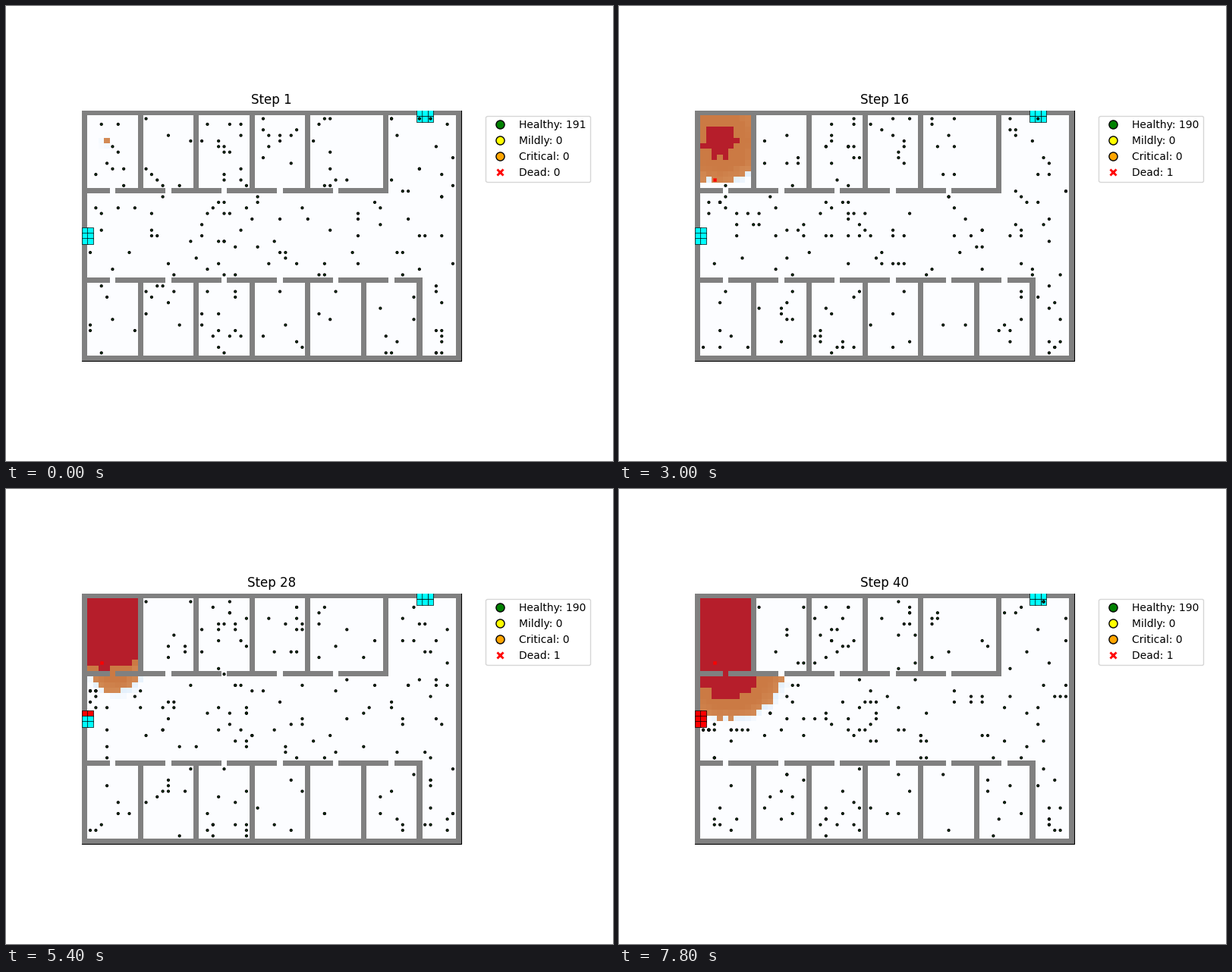
Recreate the animation shown at these times as a matplotlib script. Size 800 by 600 pixels, loop 8 s.

```python
import numpy as np
import matplotlib.pyplot as plt
from matplotlib.animation import FuncAnimation
from matplotlib.lines import Line2D

COLS, ROWS, STEPS = 68, 45, 40
BURN = 9  # steps from ignition to full blaze
FLOOR = np.array([252, 253, 255]) / 255
WALL = np.array([128, 128, 128]) / 255
HAZE = np.array([228, 240, 252]) / 255
FRESH = np.array([211, 138, 84]) / 255
FLAME = np.array([203, 122, 68]) / 255
BLAZE = np.array([182, 30, 43]) / 255

rng = np.random.default_rng(14)


def build_walls():
    wall = np.zeros((ROWS, COLS), bool)
    wall[[0, -1], :] = True
    wall[:, [0, -1]] = True
    wall[14, :55] = True
    wall[30, :61] = True
    for c in (10, 20, 30, 40, 54):
        wall[:15, c] = True
    for c in range(10, 61, 10):
        wall[30:, c] = True
    wall[14, 5:46:10] = False
    wall[30, 5:56:10] = False
    return wall


def build_ignition(wall):
    """Step at which every cell catches fire."""
    y, x = np.mgrid[:ROWS, :COLS]
    noise = rng.normal(0, 0.45, wall.shape)
    room = 1 + 2 * np.hypot(x - 4, y - 5) + noise
    hall = 19.5 + np.hypot(x - 5.6, 1.2 * (y - 14)) / 0.47 + noise
    lit = np.full(wall.shape, np.inf)
    lit[1:14, 1:10] = room[1:14, 1:10]
    lit[13, 1:10] += 1.5
    lit[12:14, 9] += 5
    lit[15:30, 1:] = hall[15:30, 1:]
    lit[5, 4] = 1
    lit[14, 5] = 20
    lit[15, 5:7] = 22.5
    lit[wall] = np.inf
    return lit


wall = build_walls()
lit = build_ignition(wall)

# count, first and last column, first and last row
ZONES = [
    (8, 11, 19, 1, 13), (15, 21, 29, 1, 13), (10, 31, 39, 1, 13),
    (10, 41, 53, 1, 13), (15, 55, 66, 1, 14), (60, 1, 54, 15, 29),
    (11, 55, 66, 15, 29), (7, 1, 9, 31, 43), (8, 11, 19, 31, 43),
    (13, 21, 29, 31, 43), (5, 31, 39, 31, 43), (3, 41, 49, 31, 43),
    (7, 51, 59, 31, 43), (10, 61, 66, 31, 43),
]
RUNNERS = [(3, 2), (6, 2), (5, 6), (6, 7), (4, 9), (5, 10), (7, 10), (7, 13)]
MOVES = [(dx, dy) for dx in (-1, 0, 1) for dy in (-1, 0, 1)]


def flee(x, y):
    """Next cell on the way out of the burning room."""
    if rng.random() < 0.15:
        return x, y
    dx, dy = np.sign(5 - x), 1
    for mx, my in ((dx, dy), (dx, 0), (0, dy)):
        if (mx or my) and not wall[y + my, x + mx]:
            return x + mx, y + my
    return x, y


def wander(x, y, step):
    near = [(x + dx, y + dy) for dx, dy in MOVES if not wall[y + dy, x + dx]]
    safe = [(a, b) for a, b in near
            if lit[b, a] > step + 3 and not (b < 15 and a < 10)]
    if safe:
        return safe[rng.integers(len(safe))]
    return max(near, key=lambda p: lit[p[1], p[0]])


def build_tracks():
    crowd = list(RUNNERS)
    for n, c0, c1, r0, r1 in ZONES:
        crowd += [(rng.integers(c0, c1 + 1), rng.integers(r0, r1 + 1))
                  for _ in range(n)]
    tracks = [crowd]
    for step in range(2, STEPS + 1):
        crowd = [flee(x, y) if x < 10 and y < 15 else wander(x, y, step)
                 for x, y in crowd]
        tracks.append(crowd)
    return np.array(tracks)


def victim(step):
    """Cell and state of the one person caught by the fire."""
    cell = (2, 11) if step < 6 else (3, 11) if step < 14 else (3, 12)
    state = sum(step >= s for s in (6, 9, 15))
    return cell, state


def floor_image(step):
    img = np.empty((ROWS, COLS, 3))
    img[:] = FLOOR
    img[wall] = WALL
    age = step - lit
    haze = (age < 0) & (age > -2.5)
    mix = (1 + age[haze] / 2.5)[:, None]
    img[haze] = FLOOR + (HAZE - FLOOR) * mix
    fire = age >= 0
    mix = np.clip(age[fire] / 5, 0, 1)[:, None]
    img[fire] = FRESH + (FLAME - FRESH) * mix
    img[age >= BURN] = BLAZE
    return img


tracks = build_tracks()
STATES = ["Healthy", "Mildly", "Critical", "Dead"]
COLORS = ["green", "yellow", "orange", "red"]

fig, ax = plt.subplots(figsize=(8, 6), dpi=100)
fig.subplots_adjust(left=0.125, right=0.75, bottom=0.11, top=0.88)
image = ax.imshow(floor_image(1), interpolation="nearest")
ax.axis("off")
ax.autoscale(False)
title = ax.set_title("Step 1")

right, bottom = COLS - 0.5, ROWS - 0.5
ax.plot([-0.5, right, right], [bottom, bottom, -0.5], color="black", lw=0.8,
        clip_on=False)

north = [(c, r) for r in range(2) for c in range(60, 63)]
west = [(c, r) for r in range(21, 24) for c in range(2)]
exits = ax.scatter(*zip(*north, *west), s=32, marker="s", edgecolors="black",
                   linewidths=0.5, zorder=2)

people = ax.scatter([], [], s=4, edgecolors="black", linewidths=1, zorder=3)
body = ax.scatter([3], [12], s=10, c="red", marker="X", linewidths=0.5,
                  zorder=3)

handles = [
    Line2D([], [], color="w", marker="X" if s == "Dead" else "o",
           markerfacecolor=c, markersize=8,
           markeredgecolor="w" if s == "Dead" else "black", label=s + ": 191")
    for s, c in zip(STATES, COLORS)
]
legend = ax.legend(handles=handles, loc="upper left", bbox_to_anchor=(1.05, 1))


def draw(i):
    step = i + 1
    image.set_data(floor_image(step))
    title.set_text(f"Step {step}")

    cell, state = victim(step)
    spots, fills = tracks[i], ["green"] * len(tracks[i])
    if state < 3:
        spots = np.vstack([spots, cell])
        fills.append(COLORS[state])
    people.set_offsets(spots)
    people.set_facecolor(fills)
    body.set_visible(state == 3)

    burnt = ["red" if step >= s else "cyan" for s in (27, 30, 32)]
    exits.set_facecolor(["cyan"] * len(north) + [burnt[r - 21] for _, r in west])

    counts = [190, 0, 0, 0]
    counts[state] += 1
    for text, name, n in zip(legend.get_texts(), STATES, counts):
        text.set_text(f"{name}: {n}")
    return []


anim = FuncAnimation(fig, draw, frames=STEPS, init_func=lambda: draw(0),
                     interval=200, repeat=True, repeat_delay=0, blit=False)
plt.show()
```
